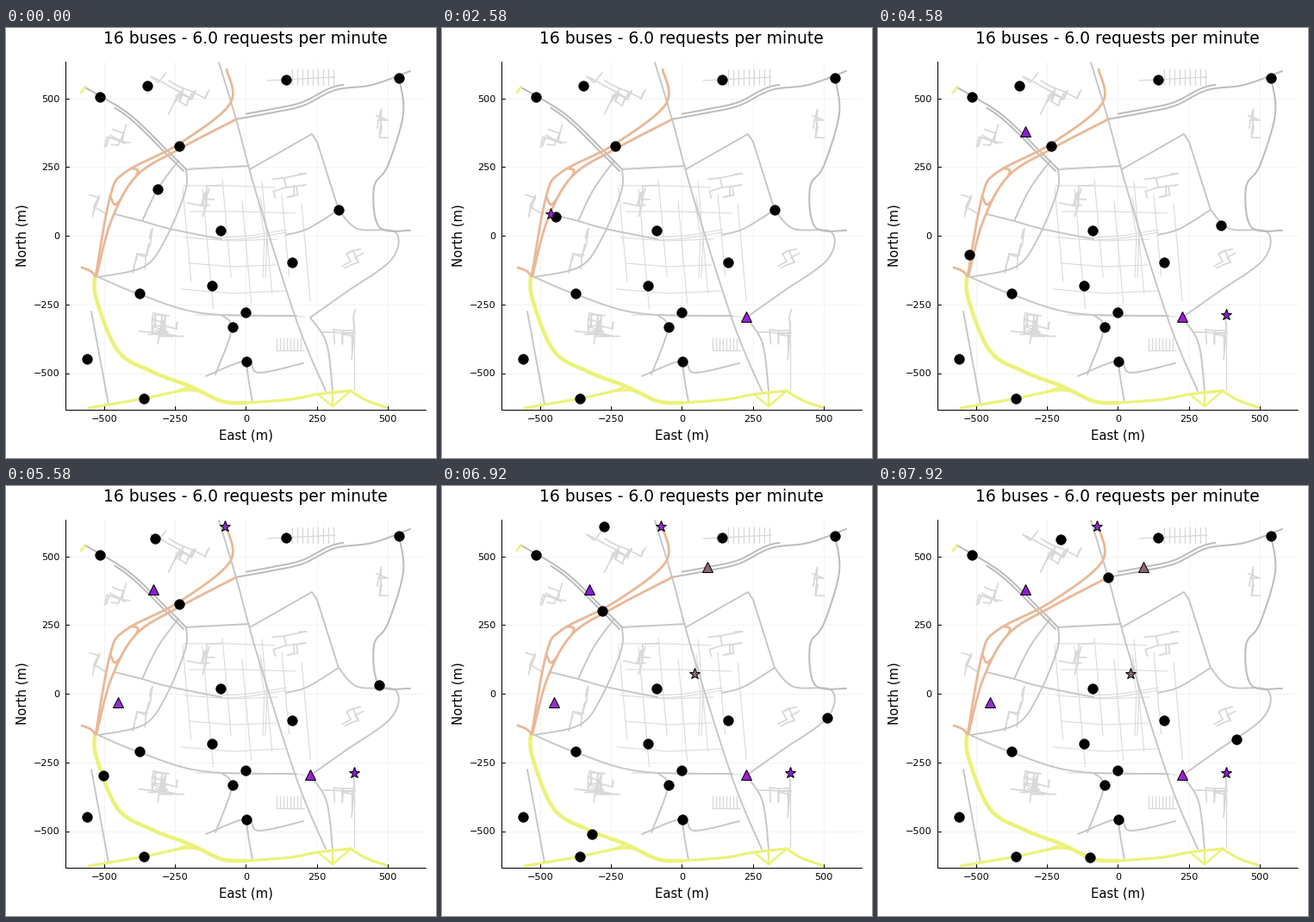
A matplotlib script that plays this animation: 499 px wide and 499 px high, repeating every 8 s.

```python
import math
import random

import matplotlib.pyplot as plt
import numpy as np
from matplotlib.animation import FuncAnimation
from matplotlib.collections import LineCollection

SIZE = 499
LOOP = 8000      # ms
TICK = 50        # ms between drawn frames
RATE = 12        # simulation steps per second
LAST = 95
PX = 0.72        # points per pixel at 100 dpi

rng = random.Random(7)
fig = plt.figure(figsize=(SIZE / 100, SIZE / 100), dpi=100, facecolor="white")
ax = fig.add_axes([0, 0, 1, 1])
ax.set_xlim(0, SIZE)
ax.set_ylim(SIZE, 0)
ax.axis("off")


def draw(roads, color, width, z):
    ax.add_collection(LineCollection(roads, colors=color, linewidths=width * PX,
                                     capstyle="round", joinstyle="round", zorder=z))


def curve(*points, n=9):
    """Catmull-Rom curve through a few points."""
    p = np.array([points[0], *points, points[-1]], float)
    t = np.linspace(0, 1, n)[:, None]
    return np.vstack([b + 0.5 * t * (c - a + t * (2 * a - 5 * b + 4 * c - d
                                                  + t * (3 * b - a - 3 * c + d)))
                      for a, b, c, d in zip(p, p[1:], p[2:], p[3:])])


def text(x, y, s, px, **kw):
    ax.text(x, y, s, size=px * PX, **{"ha": "center", "va": "baseline", **kw})


def chart_frame():
    for v in range(-500, 501, 250):
        x, y = 278.5 + 0.3282 * v, 241 - 0.319 * v
        label = str(v).replace("-", "\u2212")
        draw([[(x, 38.5), (x, 443)], [(69.5, y), (487.5, y)]], "#f0f0f0", 0.8, 0)
        draw([[(x, 443), (x, 439)], [(69.5, y), (73.5, y)]], "black", 1, 8)
        text(x, 457, label, 11.2)
        text(62.5, y + 4, label, 11.2, ha="right")
    draw([[(69.5, 38.5), (69.5, 443), (487.5, 443)]], "black", 1, 8)
    text(278, 18, "16 buses - 6.0 requests per minute", 18.8)
    text(278, 478, "East (m)", 14.9)
    text(19, 241, "North (m)", 14.9, va="center", rotation=90)


def highways():
    bypass = curve((103, 288), (105, 315), (130, 375), (170, 399), (214, 416),
                   (250, 433), (278, 435))
    south = [curve((278, 435), (330, 431), (362, 425), (400, 421)),
             curve((400, 421), (418, 432), (441, 440)),
             curve((96, 441), (160, 430), (214, 420), (245, 431))]
    fan = [[(379, 439), (x, y)] for x, y in ((362, 425), (379, 422), (400, 421))]
    draw([bypass], "#ebf27a", 4.5, 4)
    draw(south, "#ebf27a", 3.2, 4)
    draw(fan + [[(190, 424), (214, 416)], [(87, 75), (92, 68)]], "#ebf27a", 2.5, 4)

    motorway = [curve((256, 48), (260, 88), (200, 135), (139, 167), (121, 195), (104, 288)),
                curve((267, 106), (200, 141), (151, 172), (122, 224), (105, 288)),
                curve((146, 163), (153, 165), (151, 172)),
                curve((121, 195), (126, 205), (133, 199)),
                curve((88, 278), (98, 282), (104, 288))]
    draw(motorway, "#e9b896", 2.8, 4)


def town_roads():
    nw = curve((92, 69), (143, 100), (188, 143), (209, 164))
    ne = curve((266, 106), (310, 98), (345, 90), (382, 72), (425, 66), (469, 50))
    east = curve((456, 58), (461, 100), (443, 160), (427, 185), (433, 231), (469, 235))
    draw([nw, nw[6:] + (-3, 2), ne, ne[3:30] + (-1, -4), east], "#bcbcbc", 2, 3)

    roads = [curve((247, 40), (267, 106), (291, 194), (338, 342), (371, 421)),
             curve((209, 164), (208, 190), (185, 245), (160, 277), (107, 289)),
             [(209, 164), (282, 160)],
             curve((126, 216), (158, 224), (190, 233), (250, 245)),
             curve((200, 154), (176, 187), (158, 224)),
             [(99, 329), (119, 437)],
             curve((107, 289), (155, 309), (228, 331), (337, 334)),
             [(283, 164), (355, 123), (361, 132), (386, 211)],
             curve((325, 240), (350, 233), (386, 211)),
             curve((386, 211), (408, 233), (452, 237), (447, 269), (394, 307), (353, 336)),
             curve((232, 404), (279, 386), (293, 400), (345, 389)),
             curve((279, 386), (281, 405), (286, 434)),
             curve((250, 333), (262, 349), (243, 402)),
             curve((353, 336), (372, 366), (379, 421))]
    draw(roads, "#c6c6c6", 1.9, 2)


def centre_grid():
    """Narrow, slightly leaning lanes around the centre."""
    lanes = []
    for x in range(205, 345, 23):
        top, end = rng.randint(175, 205), rng.randint(285, 338)
        lanes.append([(x, top), (x + 0.09 * (end - top), end)])
    for y in range(183, 340, 30):
        left, right = rng.randint(200, 225), rng.randint(310, 350)
        lanes.append([(left, y), ((left + right) / 2, y + rng.randint(0, 5)), (right, y + 2)])
    for d in (0, 3):
        lanes.append(curve((250, 243 + d), (282, 241 + d), (326, 234 + d)))
        lanes.append([(292 + d, 196), (300 + d, 240), (298 + d, 290)])
    draw(lanes, "#dadada", 1.1, 1)


def estate(x, y, w, h, tilt, count):
    """Side streets growing at right angles from one another."""
    nodes, streets = [(0, 0)], []
    while len(streets) < count:
        a, b = rng.choice(nodes[-9:])
        angle = tilt + rng.randrange(4) * math.pi / 2 + rng.uniform(-0.2, 0.2)
        step = rng.uniform(7, 18)
        c, d = a + step * math.cos(angle), b + step * math.sin(angle)
        if abs(c) < w / 2 and abs(d) < h / 2:
            nodes.append((c, d))
            streets.append([(x + a, y + b), (x + c, y + d)])
    draw(streets, "#d8d8d6", 1.7, 1)


def side_streets():
    estate(202, 74, 75, 62, 0.5, 28)
    estate(135, 132, 44, 42, 0.3, 14)
    estate(102, 207, 30, 48, 0.4, 9)
    estate(152, 262, 60, 70, 0.2, 12)
    estate(232, 205, 60, 60, 0.1, 14)
    estate(180, 350, 95, 95, 0.2, 36)
    estate(325, 185, 80, 80, -0.2, 14)
    estate(400, 275, 50, 42, -0.4, 10)
    estate(390, 355, 46, 100, 0.1, 20)
    estate(435, 110, 50, 80, 0.2, 9)
    # rows of bays and terraces
    rows = [[(x, 48), (x, 66)] for x in range(332, 384, 6)]
    rows += [[(x, 360), (x, 374)] for x in range(314, 346, 4)]
    rows += [[(303, 61), (382, 57)], [(314, 374), (346, 374)], [(404, 340), (404, 420)]]
    draw(rows, "#d8d8d6", 1.3, 1)


chart_frame()
highways()
town_roads()
centre_grid()
side_streets()

PARKED = [(109, 80), (325.5, 60), (456, 58), (249, 235), (332, 271.5), (155, 308),
          (239, 298.5), (278.5, 330), (263, 346.5), (279, 386.5), (94.5, 384), (160.5, 430)]

# stops along each drive: (step, x, y)
DRIVES = [
    [(10, 176, 187), (20, 163.5, 213.5), (23, 158, 224), (31, 132.5, 219), (33, 126, 216),
     (40, 151, 172), (42, 141, 167), (46, 121, 195), (55, 106.5, 263), (60, 102.5, 295.5),
     (67, 113, 336), (74, 132, 377), (83, 174, 404), (95, 246, 430.5)],
    [(46, 386, 211), (55, 398, 229), (60, 408.5, 233), (67, 433, 231), (74, 454, 240),
     (83, 447, 269), (90, 424.5, 290), (95, 416, 294)],
    [(58, 164, 67), (67, 173, 61), (83, 188.5, 47), (95, 212, 62)],
    [(80, 201.5, 137), (84, 181, 148), (95, 267, 106)],
]

# colour, step of request, pick-up, drop-off, step of boarding
REQUESTS = [
    ("#9c20d4", 11, (126, 215.5), (353, 334.5), 33),
    ("#8a1ad8", 47, (404.5, 332.5), (171.5, 119.5), LAST + 1),
    ("#922fca", 59, (254.5, 47), (130, 251), LAST + 1),
    ("#8a6675", 81, (293.5, 217.5), (308.5, 94), LAST + 1),
]


def marker(pos, shape, size, color):
    return ax.plot(*pos, shape, ms=size * PX, mfc=color, mec="black", mew=PX, zorder=10)[0]


buses, = ax.plot([], [], "o", ms=11.8 * PX, color="black", mew=0.4 * PX, zorder=9)
tags = []
for color, start, pick, drop, board in REQUESTS:
    tags.append((marker(pick, "*", 13.5, color), start, board))
    tags.append((marker(drop, "^", 12.5, color), start, LAST + 1))


def along(drive, step):
    k, x, y = zip(*drive)
    return np.interp(step, k, x), np.interp(step, k, y)


def update(frame):
    step = min(LAST, round(frame * TICK * RATE / 1000))
    buses.set_data(*zip(*PARKED, *(along(d, step) for d in DRIVES)))
    for tag, start, end in tags:
        tag.set_visible(start <= step < end)
    return [buses] + [tag for tag, _, _ in tags]


anim = FuncAnimation(fig, update, frames=LOOP // TICK, interval=TICK,
                     init_func=lambda: update(0), repeat=True, repeat_delay=0, blit=False)
plt.show()
```
